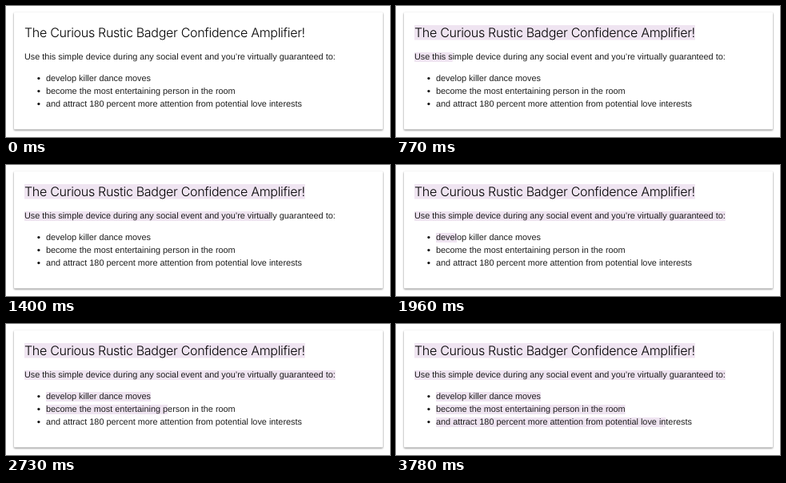
Animation, 480 px wide and 164 px high, one loop 3850 ms. Source, as an HTML page:

```html
<!DOCTYPE html>
<html lang="en">
<head>
<meta charset="utf-8">
<title>Text highlight sweep</title>
<style>
  html, body { margin: 0; width: 100%; height: 100%; overflow: hidden; background: #fff; }
  svg { display: block; width: 480px; height: 164px; }
  .card { fill: #fff; filter: drop-shadow(0 1px 1.3px rgba(0, 0, 0, .5)); }
  .mark { fill: #efe4f1; }
  text { fill: #1c1c1c; text-rendering: geometricPrecision; white-space: pre; }
  .title { font: 300 16px Inter, sans-serif; letter-spacing: -.3px; fill: #000; }
  .body { font: 10.86px "Liberation Sans", Arial, sans-serif; }
</style>
</head>
<body>
<svg id="stage" viewBox="0 0 480 164">
  <rect class="card" x="10" y="8" width="461" height="146.5" rx="1"/>
</svg>
<script>
const STEP = 70, STEPS = 55, RATE = 6.13; // RATE: letters per step
const stage = document.getElementById("stage");

// first: step of the first selected letters, lead: how many there are
const lines = [
  { text: "The Curious Rustic Badger Confidence Amplifier!", x: 23, y: 39, top: 24, h: 18.5, first: 1, lead: 6, kind: "title" },
  { text: "Use this simple device during any social event and you’re virtually guaranteed to:", x: 23, y: 67.4, first: 10, lead: 4 },
  { text: "develop killer dance moves", x: 50, y: 94, first: 28, lead: 5, bullet: true },
  { text: "become the most entertaining person in the room", x: 50, y: 110, first: 35, lead: 6, bullet: true },
  { text: "and attract 180 percent more attention from potential love interests", x: 50, y: 126, first: 44, lead: 0, bullet: true }
];

function add(tag, attrs) {
  const el = document.createElementNS("http://www.w3.org/2000/svg", tag);
  for (const key in attrs) el.setAttribute(key, attrs[key]);
  return stage.appendChild(el);
}

for (const line of lines) {
  const { text, x, y, top = Math.round(y) - 9, h = 12, kind = "body", bullet } = line;
  line.mark = add("rect", { class: "mark", x, y: top, width: 0, height: h });
  if (bullet) add("circle", { cx: 40.9, cy: y - 3.4, r: 1.6, fill: "#111" });
  line.label = add("text", { class: kind, x, y });
  line.label.textContent = text;
}

function selected(line, step) {
  if (step < line.first) return 0;
  const count = Math.floor(line.lead + RATE * (step - line.first));
  return Math.min(line.text.length, Math.max(1, count));
}

function draw(time) {
  const step = Math.floor(time / STEP + 1e-6) % STEPS;
  for (const line of lines) {
    const n = selected(line, step);
    line.mark.setAttribute("width", n ? line.label.getSubStringLength(0, n) : 0);
  }
}

const start = performance.now();
function tick() {
  draw(performance.now() - start);
  requestAnimationFrame(tick);
}
draw(0);
requestAnimationFrame(tick);
</script>
</body>
</html>
```
